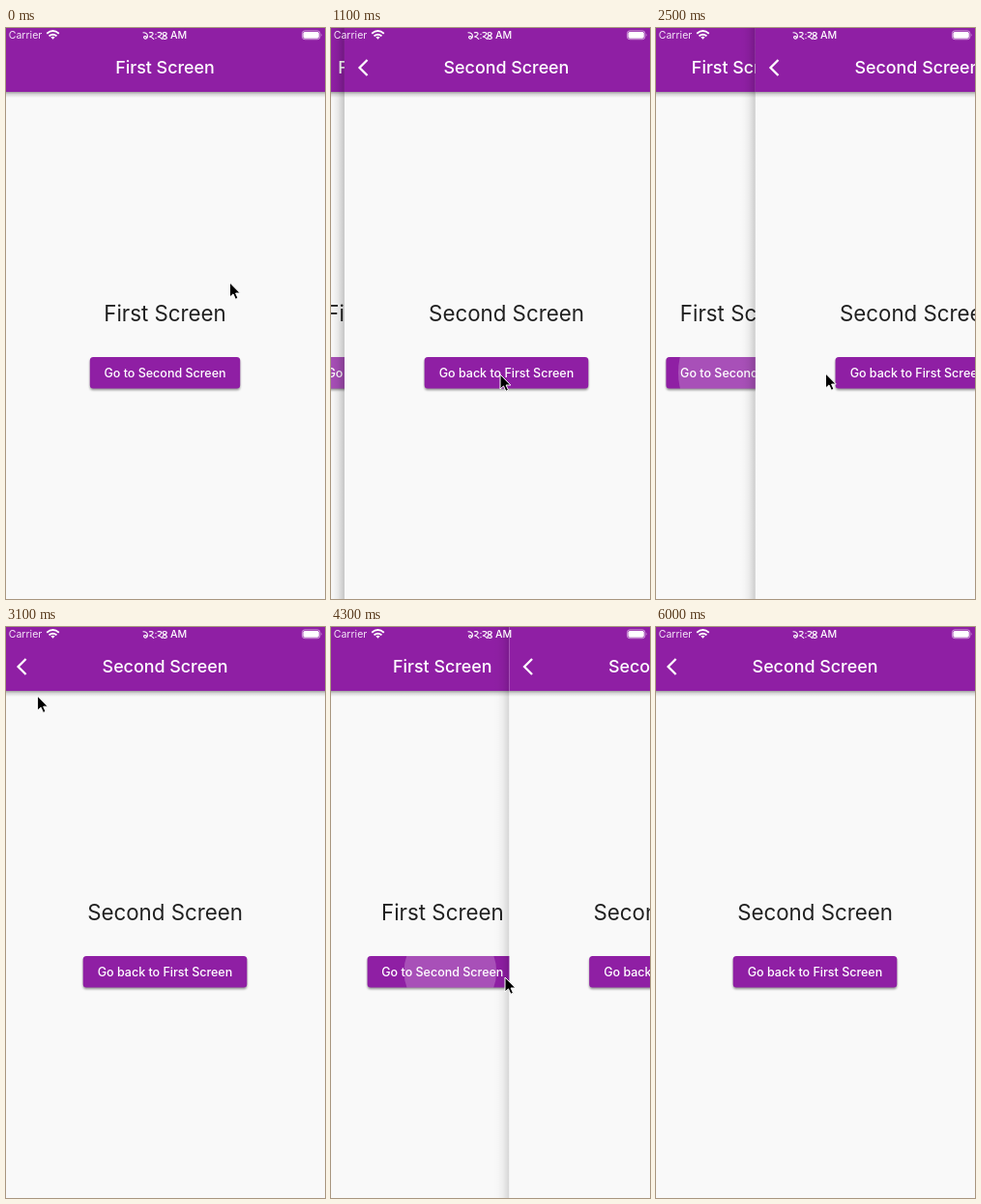
Recreate the animation shown at these times as an HTML page. Size 330 by 590 pixels, loop 6.2 s.

```html
<!DOCTYPE html>
<html lang="en">
<head>
<meta charset="utf-8">
<title>Screen navigation</title>
<style>
  html, body { margin: 0; width: 100%; height: 100%; overflow: hidden; background: #f9f9f9; }
  svg { display: block; width: 330px; height: 590px; }
  text { font-family: Inter, Roboto, sans-serif; text-anchor: middle; }
  .title { font-size: 17.87px; font-weight: 500; fill: #fff; }
  .body { font-size: 22.3px; fill: #202020; }
  .label { font-size: 12.5px; font-weight: 500; fill: #fff; }
  .line { fill: none; stroke: #fff; stroke-linecap: round; stroke-linejoin: round; }
</style>
</head>
<body>
<svg viewBox="0 0 330 590">
  <defs>
    <linearGradient id="barShadow" x2="0" y2="1">
      <stop offset="0" stop-opacity=".36"/>
      <stop offset=".4" stop-opacity=".14"/>
      <stop offset="1" stop-opacity="0"/>
    </linearGradient>
    <linearGradient id="edgeShadow">
      <stop offset="0" stop-opacity="0"/>
      <stop offset=".3" stop-opacity=".016"/>
      <stop offset=".6" stop-opacity=".07"/>
      <stop offset="1" stop-opacity=".22"/>
    </linearGradient>
    <filter id="soft" x="-10%" y="-30%" width="120%" height="170%">
      <feGaussianBlur stdDeviation="1.3"/>
    </filter>
  </defs>
  <g id="pages"></g>
  <g id="status">
    <text x="20" y="11" font-size="10.6" fill="#f3e3f6">Carrier</text>
    <g class="line" stroke-width="1.9" style="stroke-linecap:butt">
      <path d="M42.2 5.8Q48.5 .4 54.8 5.8M44.5 8.4Q48.5 4.9 52.5 8.4"/>
      <path d="M46.4 9.6Q48.5 8 50.6 9.6L48.5 11.8Z" fill="#fff" stroke="none"/>
    </g>
    <g class="line" stroke-width="1.15" role="img" aria-label="12:24">
      <path d="M142 4.8Q146.6 5 146.4 8.6Q146 11.4 143.6 11Q141.6 9.8 143.4 8.6Q145 8.2 145.4 9.8"/>
      <path id="two" d="M148.4 4.8Q152.4 4 152 6.4Q151.4 8 148.6 9Q150.6 9 152.8 11.4"/>
      <use href="#two" x="8.6"/>
      <path d="M155 6.4v.2M155 10.4v.2"/>
      <path d="M164.2 8Q161.4 6.6 162.2 5.2Q164.2 3.8 166 5.2Q166.8 6.6 164.2 8Q161.2 9.4 162.2 10.8Q164.2 12 166.2 10.8Q167 9.4 164.2 8Z"/>
    </g>
    <text x="178.6" y="11" font-size="10.6" font-weight="500" fill="#fff">AM</text>
    <rect x="306.4" y="2.9" width="18.4" height="8.8" rx="2.6" fill="none" stroke="#d3a5dc" stroke-width=".9"/>
    <rect x="307.4" y="3.9" width="16.4" height="6.8" rx="1.7" fill="#fff"/>
    <path d="M325.8 5.6Q327.4 7.3 325.8 9Z" fill="#d3a5dc"/>
  </g>
  <path id="cursor" d="M0 0V15L3.5 11.9L5.9 17.3L8.5 16.2L6.1 11H10.8Z" fill="#000" stroke="#fff" stroke-width="1" stroke-linejoin="round"/>
</svg>
<script>
const LOOP = 6200, STEP = 100;
const LEFT = -3, WIDTH = 335, CENTER = 164.5;
const PURPLE = '#8f1fa4';
const SLIDE = 400;

const $ = id => document.getElementById(id);
const clamp = v => Math.max(0, Math.min(1, v));
const mix = (a, b, k) => a + (b - a) * k;

function page(id, title, label, buttonWidth, extra = '') {
  const x = CENTER - buttonWidth / 2;
  const rect = `x="${x}" width="${buttonWidth}" height="32.4" rx="3.5"`;
  return `<g id="${id}">
    ${extra}
    <rect x="${LEFT}" width="${WIDTH}" height="590" fill="#f9f9f9"/>
    <rect x="${LEFT}" y="66" width="${WIDTH}" height="6" fill="url(#barShadow)"/>
    <rect x="${LEFT}" width="${WIDTH}" height="66" fill="${PURPLE}"/>
    <text class="title" x="${CENTER}" y="47">${title}</text>
    <text class="body" x="${CENTER}" y="303">${title}</text>
    <clipPath id="${id}Clip"><rect ${rect} y="340"/></clipPath>
    <rect ${rect} y="341.8" opacity=".4" filter="url(#soft)"/>
    <rect ${rect} y="340" fill="${PURPLE}"/>
    <g clip-path="url(#${id}Clip)"><circle id="${id}Ripple" cy="356" fill="#fff"/></g>
    <text class="label" x="${CENTER}" y="360.6">${label}</text>
  </g>`;
}

$('pages').innerHTML =
  page('first', 'First Screen', 'Go to Second Screen', 155.4) +
  page('second', 'Second Screen', 'Go back to First Screen', 169.6,
    `<rect id="edge" x="${LEFT - 16.7}" width="16.7" height="590" fill="url(#edgeShadow)"/>`);
$('second').insertAdjacentHTML('beforeend',
  '<path class="line" style="stroke-linecap:butt;stroke-linejoin:miter" stroke-width="2.3" d="M20.6 33L12.6 41L20.6 49"/>');

// Slides between the screens; "tap" is the button release, "page" holds the button.
const slides = [
  { at: 870, to: 1, page: 'first', tap: 870 },
  { at: 1755, to: 0, page: 'second', tap: 1749 },
  { at: 2388, to: 1, page: 'first', tap: 2396 },
  { at: 3270, to: 0 },
  { at: 4232, to: 1, page: 'first', tap: 4247 }
];

// Pointer stops: time, x, y
const stops = [
  [0, 231.5, 263], [600, 174, 357], [800, 174, 357], [1400, 176, 359],
  [1800, 176, 359], [2300, 175.5, 357], [2700, 175.5, 357], [3200, 16, 38],
  [3300, 16, 38], [4000, 180, 362], [4400, 180, 362], [5000, 185, 343]
];
const POINTER_END = 5900;

function bezier(a, b, s) {
  return 3 * a * s * (1 - s) ** 2 + 3 * b * s * s * (1 - s) + s ** 3;
}

function slideEase(x) {
  let low = 0, high = 1;
  for (let i = 0; i < 24; i++) {
    const s = (low + high) / 2;
    if (bezier(.35, .33, s) < x) low = s; else high = s;
  }
  return bezier(.91, .97, low);
}

function shownAt(t) {
  const slide = slides.filter(s => s.at <= t).pop();
  if (!slide) return 0;
  const k = slideEase(clamp((t - slide.at) / SLIDE));
  return slide.to ? k : 1 - k;
}

function pointerAt(t) {
  const i = stops.findIndex(s => s[0] > t);
  if (i < 0) return stops[stops.length - 1].slice(1);
  const [t0, x0, y0] = stops[i - 1], [t1, x1, y1] = stops[i];
  const u = (t - t0) / (t1 - t0), k = u * u * (3 - 2 * u);
  return [mix(x0, x1, k), mix(y0, y1, k)];
}

function drawRipple(id, t) {
  const slide = slides.find(s => s.page === id && t >= s.tap - 180 && t < s.tap + 375);
  const ripple = $(id + 'Ripple');
  ripple.setAttribute('opacity', 0);
  if (!slide) return;
  const since = t - slide.tap;
  const fade = clamp((since + 180) / 75) * clamp((375 - since) / 150);
  ripple.setAttribute('opacity', .22 * fade);
  ripple.setAttribute('r', Math.min(82, since < 0 ? 24 + since * .03 : 24 + since * .45));
  ripple.setAttribute('cx', mix(175, CENTER, clamp(since / 225)));
}

function draw(t) {
  const shown = shownAt(t);
  $('first').setAttribute('transform', `translate(${-shown * WIDTH / 3} 0)`);
  $('second').setAttribute('transform', `translate(${(1 - shown) * WIDTH} 0)`);
  $('second').setAttribute('visibility', shown > 0 ? 'visible' : 'hidden');
  $('edge').setAttribute('opacity', .4 + .6 * shown);
  drawRipple('first', t);
  drawRipple('second', t);
  $('cursor').setAttribute('transform', `translate(${pointerAt(t)})`);
  $('cursor').setAttribute('visibility', t < POINTER_END ? 'visible' : 'hidden');
}

const start = performance.now();
function tick() {
  const t = (performance.now() - start) % LOOP;
  draw(Math.floor(t / STEP) * STEP);
  requestAnimationFrame(tick);
}
tick();
</script>
</body>
</html>
```
